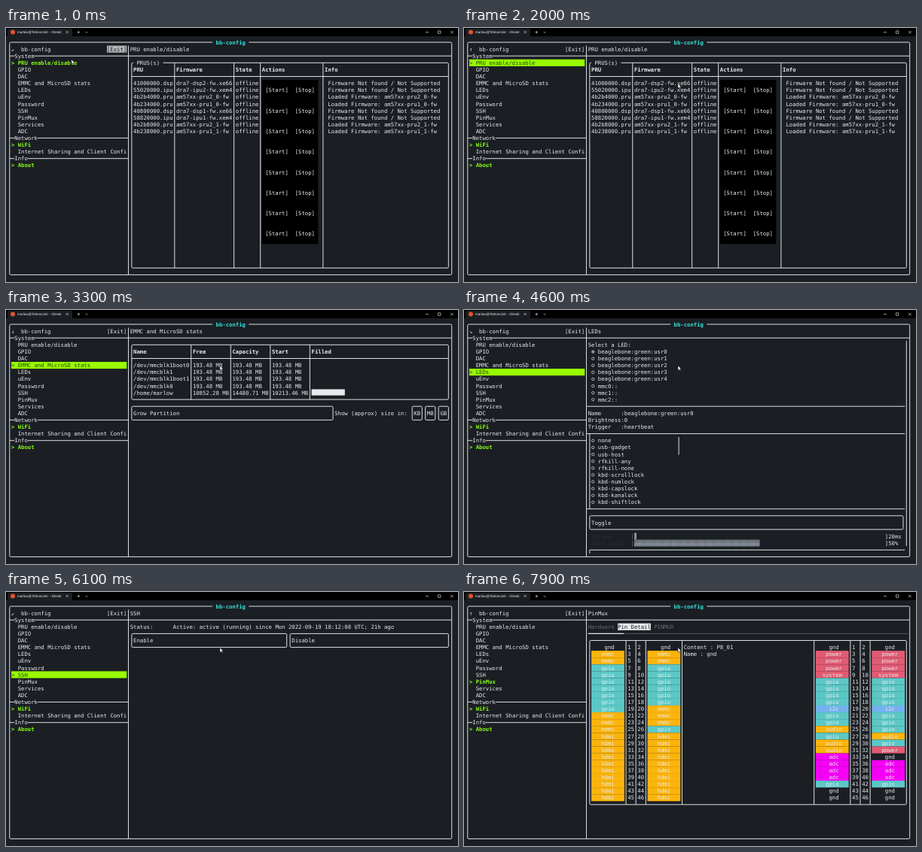
Animation of 600x338 px, one loop 8 s. Source, as an HTML page:

```html
<!DOCTYPE html>
<html lang="en">
<head>
<meta charset="utf-8">
<title>bb-config</title>
<style>
  html, body { margin: 0; width: 100%; height: 100%; overflow: hidden; background: #1b1f24; }
  svg { display: block; width: 600px; height: 338px; }
  text { font: 7.275px "DejaVu Sans Mono", monospace; fill: #e6eaed; text-rendering: geometricPrecision; }
  .bold { font-weight: bold; }
  .lime { font-weight: bold; fill: #86fb14; }
  .cyan { font-weight: bold; fill: #34dfd8; }
  .dark { fill: #1b1f24; }
  .onlime { fill: #2b4508; }
  .dim { fill: #666c72; }
  .faint { fill: #2b3138; }
  .tab { font: 4.5px "Liberation Sans", Arial, sans-serif; fill: #f0f0f0; }
  .line { fill: none; stroke: #dde1e4; stroke-width: 1; }
</style>
</head>
<body>
<svg viewBox="0 0 600 338">
  <defs>
    <pattern id="shade" width="2.19" height="2.28" patternUnits="userSpaceOnUse">
      <rect width="2.19" height="2.28" fill="#62676e"/>
      <rect width="1.1" height="1.14" fill="#a2a7ad"/>
    </pattern>
    <pattern id="tint" width="4.38" height="2" patternUnits="userSpaceOnUse">
      <rect width="1.4" height="1.2" fill="#c98bd0"/>
      <rect x="2.2" width="1.4" height="1.2" fill="#63bfc4"/>
    </pattern>
  </defs>
  <rect width="600" height="338" fill="#1b1f24"/>
  <rect width="600" height="11" fill="#000"/>
  <path d="M2 11V3q0-2 2-2H86q2 0 2 2V11Z" fill="#1b1f24"/>
  <circle cx="9" cy="5.6" r="3" fill="#e2532b"/>
  <text class="tab" x="15" y="7.2">marlow@TelmarUnit: ~/Deskt</text>
  <path d="M79.7 4l3 3m0-3l-3 3M94.5 5.6h3.6m-1.8-1.8v3.6M105.6 5l1.4 1.4 1.4-1.4M557 5.6h4M573.5 3.9h3.4v3.4h-3.4zM590.2 3.9l3.4 3.4m0-3.4l-3.4 3.4" fill="none" stroke="#d4d4d4" stroke-width=".7"/>
  <g id="frame"></g>
  <g id="scene"></g>
  <rect id="mark" y="54.8" height="1.2" fill="#e6eaed"/>
  <text id="spin" x="6.98" y="30.8"></text>
  <path id="mouse" d="M0 0V6.2L1.5 4.9L2.5 7.1L3.5 6.6L2.5 4.5H4.4Z" fill="#fff" stroke="#101214" stroke-width=".5"/>
</svg>
<script>
const LOOP = 8000, CW = 4.38, RH = 9.1;
const $ = id => document.getElementById(id);

// Terminal grid: left edge and centre of a column, centre of a row.
const px = c => 2.6 + c * CW;
const mid = c => px(c + .5);
const py = r => 19 + r * RH;

const text = (c, r, s, cls = '') => [...s.matchAll(/\S+/g)].map(m =>
  `<text x="${px(c + m.index).toFixed(2)}" y="${(py(r) + 2.65).toFixed(2)}" class="${cls}">${m[0]}</text>`).join('');
const lines = (c, r, list, step = 1) => list.map((s, i) => text(c, r + i * step, s)).join('');
const fill = (c, r, w, h, color) =>
  `<rect x="${px(c)}" y="${py(r) - RH / 2}" width="${w * CW}" height="${h * RH}" fill="${color}"/>`;
const path = d => `<path class="line" d="${d}"/>`;
const hl = (r, x1, x2) => path(`M${x1} ${py(r)}H${x2}`);
const vl = (c, r1, r2) => path(`M${mid(c)} ${py(r1)}V${py(r2)}`);
const box = (c1, r1, c2, r2) =>
  `<rect class="line" x="${mid(c1)}" y="${py(r1)}" width="${(c2 - c1) * CW}" height="${(r2 - r1) * RH}" rx="1.5"/>`;
const button = (c1, r, c2, label) => box(c1, r - 1, c2, r + 1) + text(c1 + 1, r, label);

const BG = '#1b1f24', LIGHT = '#e6eaed', LIME = '#98fb00';
const SECTIONS = { 2: 'System', 14: 'Network', 17: 'Info' };
const MENU = {
  3: 'PRU enable/disable', 4: 'GPIO', 5: 'DAC', 6: 'EMMC and MicroSD stats', 7: 'LEDs', 8: 'uEnv',
  9: 'Password', 10: 'SSH', 11: 'PinMux', 12: 'Services', 13: 'ADC',
  15: 'WiFi', 16: 'Internet Sharing and Client Confi', 18: 'About'
};

function frame() {
  let s = box(0, 0, 134, 34) + fill(62, 0, 11, 1, BG) + text(63, 0, 'bb-config', 'cyan');
  s += text(4, 1, 'bb-config') + vl(36, .5, 34) + hl(2, mid(36), mid(134));
  for (const [r, name] of Object.entries(SECTIONS))
    s += hl(r, mid(0), px(2)) + text(2, +r, name) + hl(r, px(2 + name.length), mid(36));
  return s;
}

function menu(sel, focus) {
  let s = focus === 'exit' ? fill(30, 1, 6, 1, '#b3b7ba') : '';
  s += text(30, 1, '[Exit]', focus === 'exit' ? 'dark' : '');
  for (const [key, name] of Object.entries(MENU)) {
    const r = +key, active = r === sel;
    const lit = active && focus === 'menu';
    const marked = active || r === 15 || r === 18;
    if (lit) s += fill(1, r, 35, 1, LIME);
    const cls = lit ? 'onlime' : marked ? 'lime' : '';
    s += (marked ? text(1, r, '>', cls) : '') + text(3, r, name, cls);
  }
  return s;
}

function table(bottom, cols, heads) {
  return box(37, 3, 133, bottom) + hl(5, mid(37), mid(133)) +
    heads.map((h, i) => text(cols[i], 4, h, 'bold') + (i ? vl(cols[i] - 1, 3, bottom) : '')).join('');
}

function pru() {
  const cols = [38, 51, 69, 77, 96];
  const units = ['41000000.dsp dra7-dsp2-fw.xe66', '55020000.ipu dra7-ipu2-fw.xem4',
    '4b2b4000.pru am57xx-pru2_0-fw', '4b234000.pru am57xx-pru1_0-fw',
    '40800000.dsp dra7-dsp1-fw.xe66', '58820000.ipu dra7-ipu1-fw.xem4',
    '4b2b8000.pru am57xx-pru2_1-fw', '4b238000.pru am57xx-pru1_1-fw'];
  let s = table(33, cols, ['PRU', 'Firmware', 'State', 'Actions', 'Info']);
  s += fill(38, 3, 9, 1, BG) + text(39, 3, 'PRUS(s)') + fill(77, 6, 17, 24, '#000');
  units.forEach((u, i) => {
    const [id, fw] = u.split(' '), r = 6 + i;
    const info = id.endsWith('pru') ? 'Loaded Firmware: ' + fw : 'Firmware Not found / Not Supported';
    s += text(38, r, id) + text(51, r, fw) + text(69, r, 'offline') + text(97, r, info);
    s += text(78, 7 + 3 * i, '[Start]  [Stop]');
  });
  return s;
}

function emmc() {
  const cols = [38, 56, 68, 80, 92], size = '193.48 MB';
  const disks = ['/dev/mmcblk1boot0', '/dev/mmcblk1', '/dev/mmcblk1boot1', '/dev/mmcblk0'];
  let s = table(11, cols, ['Name', 'Free', 'Capacity', 'Start', 'Filled']) + lines(38, 6, disks);
  for (const c of cols.slice(1, 4)) s += lines(c, 6, disks.map(() => size));
  ['/home/marlow', '10852.28 MB', '14480.71 MB', '10213.46 MB'].forEach((v, i) => s += text(cols[i], 10, v));
  s += fill(92, 10, 10.1, .9, LIGHT) + button(37, 13, 98, 'Grow Partition');
  s += text(99, 13, 'Show (approx) size in:');
  return s + button(122, 13, 125, 'KB') + button(126, 13, 129, 'MB') + button(130, 13, 133, 'GB');
}

function leds() {
  const radio = (r, names, on) => names.map((n, i) =>
    `<circle cx="${mid(38)}" cy="${py(r + i) + .2}" r="1.7" fill="none" stroke="${LIGHT}" stroke-width=".7"/>` +
    (i === on ? `<circle cx="${mid(38)}" cy="${py(r + i) + .2}" r=".9" fill="${LIGHT}"/>` : '') +
    text(40, r + i, n)).join('');
  const names = [0, 1, 2, 3, 4].map(i => 'beaglebone:green:usr' + i).concat('mmc0::', 'mmc1::', 'mmc2::');
  const end = px(133);
  let s = text(37, 3, 'Select a LED:') + radio(4, names, 0) + hl(12, mid(36), end);
  s += lines(37, 13, ['Name      :' + names[0], 'Brightness:0', 'Trigger   :heartbeat']) + hl(16, mid(36), end);
  s += radio(17, ['none', 'usb-gadget', 'usb-host', 'rfkill-any', 'rfkill-none', 'kbd-scrolllock',
    'kbd-numlock', 'kbd-capslock', 'kbd-kanalock', 'kbd-shiftlock'], -1);
  s += vl(37, 16, 27) + path(`M${mid(64)} 169V192.5`) + hl(27, mid(36), end);
  s += path('M587.3 41V314') + button(37, 29, 132, 'Toggle');
  s += text(38, 31, 'Period', 'faint') + text(38, 32, 'Duty cycle', 'faint');
  s += fill(51, 31, .7, 1, '#8a8f95') + fill(51, 32, 38, 1, 'url(#shade)') + fill(51, 32.5, 38, .3, 'url(#tint)');
  for (const [r, v] of [[31, '20ms'], [32, '50%']])
    s += text(50, r, '[', 'dim') + text(127, r, ']') + text(128, r, v);
  return s + path(`M${mid(37)} 324V${py(33)}H${end}`);
}

function ssh() {
  return text(37, 3, 'Status:      Active: active (running) since Mon 2022-09-19 18:12:08 UTC; 21h ago') +
    button(37, 5, 84, 'Enable') + button(85, 5, 133, 'Disable');
}

// Pin roles, one entry per row of the header: odd pin, then even pin.
const run = s => s.split(' ').flatMap(p => {
  const [name, n] = p.split('*');
  return Array(+(n || 1)).fill(name);
});
const P8 = [run('gnd emmc*2 gpio*7 emmc*3 hdmi*10'), run('gnd emmc*2 gpio*6 emmc*3 gpio hdmi*10')];
const P9 = [run('gnd power*3 system gpio*4 i2c gpio*2 audio gpio audio*2 adc*4 gpio gnd*2'),
  run('gnd power*3 system gpio*4 i2c gpio*3 audio gpio power gnd adc*3 gpio gnd*2')];
const ROLE = { emmc: '#fbb40c', hdmi: '#fbb40c', audio: '#fbb40c', gpio: '#5bc8c6', i2c: '#73b2ef',
  power: '#e25a72', system: '#e25a72', adc: '#f500f5' };

function tabs(sel, focus) {
  const names = [[37, 'Hardware'], [46, 'Pin Detail'], [57, 'PINMUX']];
  return names.map(([c, n], i) => {
    const lit = i === sel && focus === 'tabs';
    return (lit ? fill(c, 3, n.length, 1, LIGHT) : '') + text(c, 3, n, lit ? 'dark' : i === sel ? 'bold' : 'dim');
  }).join('') + `<path d="M${px(37)} ${py(4)}H${px(134)}" stroke="#50565b"/>`;
}

function hardware(focus) {
  const wall = (c, a, b) => lines(c, a, Array(b - a + 1).fill('|'));
  const bar = n => '+' + '='.repeat(n) + '+';
  let s = tabs(0, focus);
  s += text(58, 6, bar(10)) + wall(58, 7, 14) + wall(69, 7, 14) + text(58, 15, bar(10));
  s += text(63, 9, 'DC') + text(62, 11, 'POWER') + text(56, 9, '.-') + text(70, 9, '-'.repeat(9) + '=+');
  s += text(80, 8, bar(18)) + wall(80, 10, 15) + wall(99, 10, 15) + text(80, 16, bar(18)) + text(86, 12, 'Ethernet');
  s += text(99, 9, '+' + '-'.repeat(20) + ':.') + text(121, 10, ':-') + text(122, 11, '+') + wall(122, 12, 33);
  s += text(53, 10, '.:') + text(52, 11, '-:') + text(52, 12, '-:') + text(52, 13, ':') + wall(52, 14, 33);
  s += text(78, 29, '+' + '-'.repeat(22) + '+') + wall(78, 30, 33) + wall(101, 30, 33);
  s += text(83, 32, '___  ___   ___') + text(82, 33, '/ __|/ _ \\ / __|');
  for (const [c, name, roles] of [[55, 'P9', P9], [115, 'P8', P8]]) {
    const head = name === 'P9' ? c + 1 : c + 2;
    s += fill(head, 19, 2, 1, '#62aeea') + text(head, 19, name);
    for (let i = 0; i < 14; i++) {
      [0, 1].forEach(k => {
        const color = ROLE[roles[k][i]], at = c + 3 * k;
        if (color) s += fill(at, 20 + i, 2, 1, color);
        s += text(at, 20 + i, String(2 * i + 1 + k).padStart(2, '0'));
      });
      s += text(c + 2, 20 + i, '|');
    }
  }
  return s;
}

function detail(focus) {
  let s = tabs(1, focus) + box(37, 5, 133, 29);
  for (const c of [48, 51, 54, 65, 105, 116, 119, 122]) s += vl(c, 5, 29);
  s += text(66, 6, 'Content : P8_01') + text(66, 7, 'Name : gnd');
  for (const [c, roles] of [[38, P8], [106, P9]])
    [0, 1].forEach(k => roles[k].forEach((name, i) => {
      const at = c + 17 * k, r = 6 + i;
      if (ROLE[name]) s += fill(at, r, 10, 1, ROLE[name]);
      s += text(at + Math.ceil((10 - name.length) / 2), r, name);
      s += text(c + 11 + 3 * k, r, String(2 * i + 1 + k));
    }));
  return s;
}

// Start time, menu row, keyboard focus, page body.
const SCENES = [
  [0, 3, 'exit', pru], [1700, 3, 'menu', pru], [2200, 4, 'menu'], [3000, 5, 'menu'],
  [3300, 6, 'menu', emmc], [4000, 7, 'menu', leds], [4800, 8, 'menu'], [5300, 9, 'menu'],
  [5600, 10, 'menu', ssh], [6800, 11, 'menu', hardware], [7300, 11, 'title', hardware],
  [7500, 11, 'tabs', hardware], [7900, 11, 'tabs', detail]
];
const ARROWS = '↙↓↘→↗↑↖←';
const TICKS = [200, 700, 1200, 1700, 2000, 2200, 2600, 3000, 3300, 3400, 3500, 3700, 4000, 4100, 4200,
  4300, 4500, 4600, 4800, 5100, 5300, 5600, 5900, 6100, 6600, 6900, 7100, 7300, 7900];

function draw([, row, focus, body]) {
  const lit = focus === 'title';
  return menu(row, focus) + (lit ? fill(37, 1, 97, 1, LIGHT) : '') +
    text(37, 1, MENU[row], lit ? 'dark' : '') + (body ? body(focus) : '');
}

const clamp = v => Math.max(0, Math.min(1, v));
const ease = v => v * v * (3 - 2 * v);
const views = SCENES.map(draw);
let shown = -1;

function update(t) {
  const n = SCENES.filter(s => s[0] <= t).length - 1;
  if (n !== shown) {
    shown = n;
    $('scene').innerHTML = views[n];
  }
  $('spin').textContent = ARROWS[TICKS.filter(k => k <= t).length % 8];

  // The tab underline stretches ahead, then its tail follows.
  const k = clamp((t - 7860) / 300);
  const x1 = px(37 + 9 * k ** 3), x2 = px(45 + 11 * (1 - (1 - k) ** 2));
  $('mark').setAttribute('x', x1);
  $('mark').setAttribute('width', t < 6800 ? 0 : x2 - x1);

  const m = ease(clamp((t - 50) / 950));
  $('mouse').setAttribute('transform', `translate(${87 + 197 * m} ${42 + 32 * m})`);
}

$('frame').innerHTML = frame();
function tick() {
  update(performance.now() % LOOP);
  requestAnimationFrame(tick);
}
tick();
</script>
</body>
</html>
```
